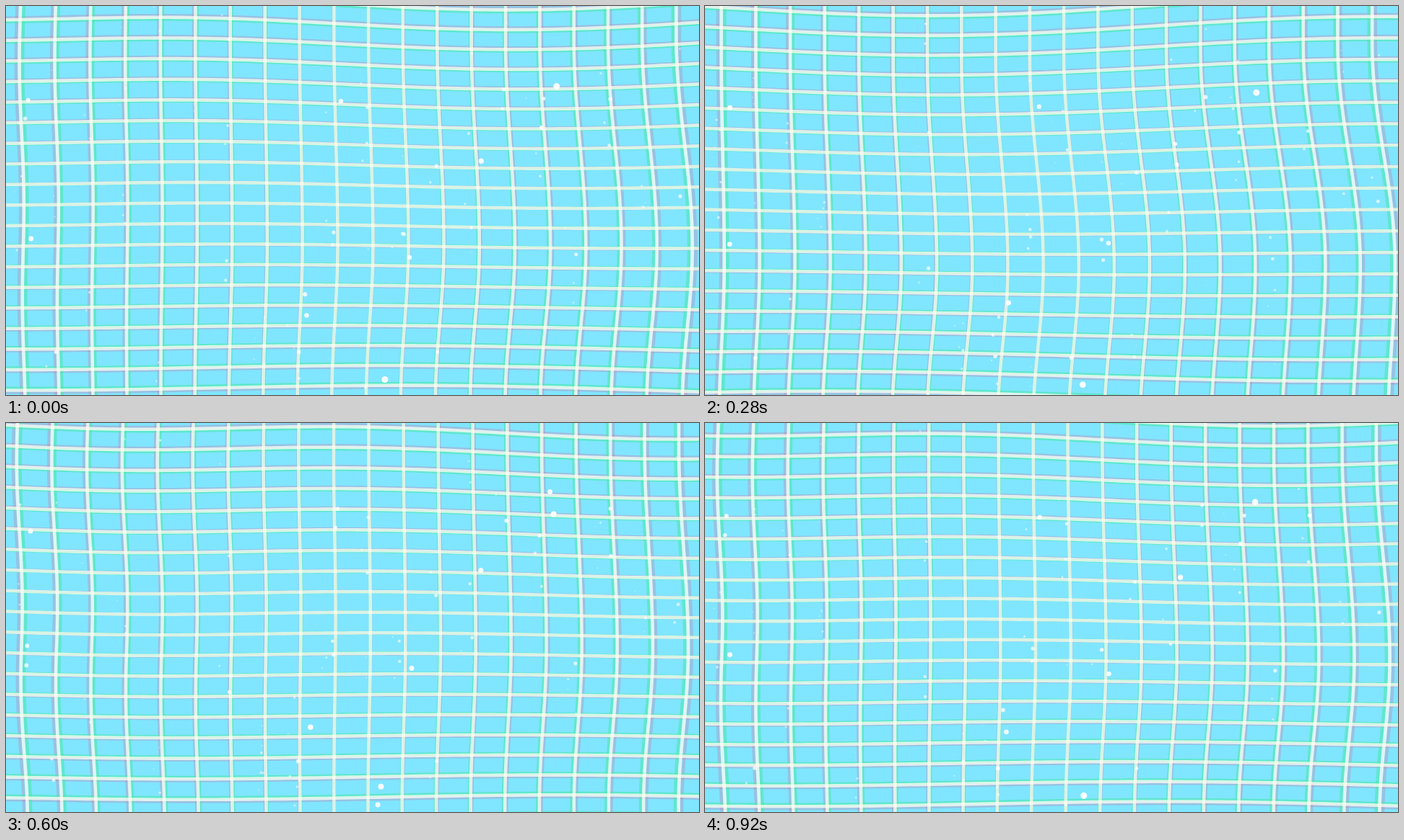
An HTML page with a canvas for the animation above (960 ms loop, 960x540 px).

```html
<!DOCTYPE html>
<html lang="en">
<head>
<meta charset="utf-8">
<title>Waving grid</title>
<style>
  html, body { margin: 0; width: 100%; height: 100%; overflow: hidden; background: #80e5ff; }
  canvas { display: block; }
</style>
</head>
<body>
<canvas id="stage" width="960" height="540"></canvas>
<script>
const W = 960, H = 540, LOOP = 960, STEP = 40;
const COLS = 20, ROWS = 19, CELL_W = W / COLS, CELL_H = H / ROWS;
const ctx = document.getElementById('stage').getContext('2d');

const mix = (a, b, k) => a + (b - a) * k;
const ease = k => (1 - Math.cos(Math.PI * Math.min(1, Math.max(0, k)))) / 2;

// A wave that swings smoothly between its crests and troughs, given as [x, height]
const wave = (...turns) => x => {
  let i = 1;
  while (i < turns.length - 1 && x > turns[i][0]) i++;
  const [x0, h0] = turns[i - 1], [x1, h1] = turns[i];
  return mix(h0, h1, ease((x - x0) / (x1 - x0)));
};

const riseTop = wave([-400, -5], [-50, 5.3], [200, 1.6], [690, 18.5], [1320, -8]);
const riseBottom = wave([-400, 4], [0, 7.6], [530, 1.4], [1250, 15]);
const shiftTop = wave([-400, -8.5], [330, -1.3], [1400, -12]);
const shiftMid = wave([-400, -4], [100, 0], [1350, 20]);
const shiftBottom = wave([-300, 4.2], [560, -5.2], [1400, 10]);

function warp(x, y, angle) {
  const z = x + 360 * Math.sin(angle) - 22 * Math.cos(2 * angle) + 8;
  const v = y - 28 * Math.sin(angle);
  const mid = shiftMid(z);
  const bend = v < 325
    ? mix(shiftTop(z), mid, ease((v - 30) / 295))
    : mix(mid, shiftBottom(z), ease((v - 325) / 225));
  const ripple = 2 * ease((350 - z) / 500) * Math.sin(2 * Math.PI * (v - 170) / 330);
  const rise = mix(riseTop(z), riseBottom(z), (y - 20) / 485);
  return [x + bend + ripple, y + rise];
}

function gridPaths(t) {
  const angle = 2 * Math.PI * t / LOOP;
  const across = new Path2D(), down = new Path2D();
  const addLine = (path, length, point) => {
    for (let s = -48; s <= length + 48; s += 12) path.lineTo(...warp(...point(s), angle));
  };
  const addLines = (path, count, length, point) => {
    for (let i = -2; i <= count; i++) {
      const line = new Path2D();
      addLine(line, length, s => point(i, s));
      path.addPath(line);
    }
  };
  addLines(across, ROWS, W, (i, s) => [s, (i + 0.5 + t / LOOP) * CELL_H]);
  addLines(down, COLS, H, (i, s) => [(i + 0.5) * CELL_W, s]);
  return [across, down];
}

function strokeGrid(paths, color, scale) {
  ctx.save();
  ctx.translate(W / 2, H / 2);
  ctx.scale(scale, scale);
  ctx.translate(-W / 2, -H / 2);
  ctx.strokeStyle = color;
  ctx.lineWidth = 4.6;
  paths.forEach(path => ctx.stroke(path));
  ctx.restore();
}

let seed = 7;
const random = () => (seed = seed * 16807 % 2147483647) / 2147483647;

// x, y and time where the arc turns back, and the largest radius
const sparkle = (x, y, peak, size) => ({ x, y, peak, size });
const sparkles = [
  sparkle(764, 118, 200, 4.5), sparkle(525, 520, 50, 4.5),
  sparkle(659, 211, 800, 3.7), sparkle(422, 420, 520, 3.8),
  sparkle(562, 341, 620, 3.5), sparkle(464, 134, 60, 3.3),
  sparkle(35, 145, 400, 3.5), sparkle(35, 326, 100, 3.5)
];
for (let i = 0; i < 80; i++) {
  const x = (i % COLS) * CELL_W + 22;
  sparkles.push(sparkle(x, random() * H, random() * LOOP, 0.7 + 2.3 * random() ** 2));
}

function drawSparkle({ x, y, peak, size }, t) {
  const curve = 6 + 6 * size;
  for (const turn of [-1, 0, 1]) {
    const dt = (t - peak + turn * LOOP) / 1000;
    const r = size * Math.cos(1.25 * dt);
    if (Math.abs(dt) > 1.2 || r < 0.3) continue;
    ctx.fillStyle = `rgba(255,255,255,${Math.min(0.95, 0.15 + 0.22 * r)})`;
    ctx.beginPath();
    ctx.arc(x - curve * dt * dt, y + 29 * dt - 0.6 * curve * dt * dt, r, 0, 2 * Math.PI);
    ctx.fill();
  }
}

function draw(t) {
  ctx.fillStyle = '#80e5ff';
  ctx.fillRect(0, 0, W, H);
  const paths = gridPaths(t);
  strokeGrid(paths, 'rgba(220,90,140,.25)', 1.01);
  strokeGrid(paths, 'rgba(68,234,164,.55)', 0.99);
  strokeGrid(paths, 'rgba(255,253,243,.75)', 1);
  for (const s of sparkles) drawSparkle(s, t);
}

const start = performance.now();
function tick() {
  const t = (performance.now() - start) % LOOP;
  draw(Math.floor(t / STEP) * STEP);
  requestAnimationFrame(tick);
}
tick();
</script>
</body>
</html>
```
